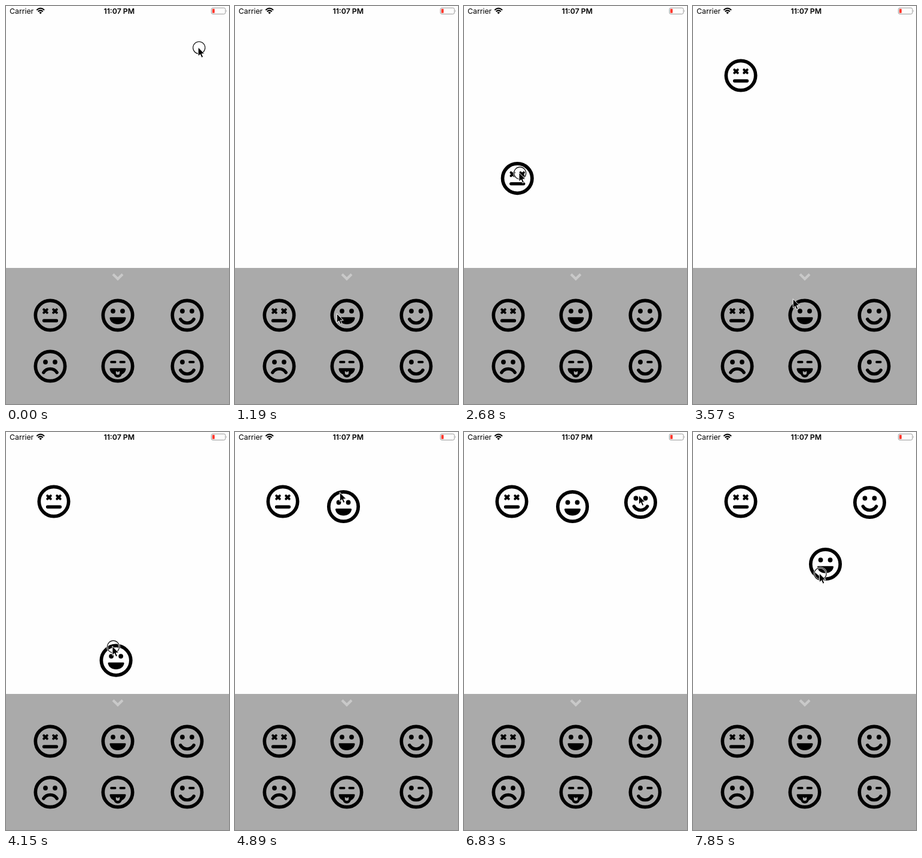
Write an HTML page that moves like this. It is 373x664 px and loops after 8 s.

```html
<!DOCTYPE html>
<html lang="en">
<head>
<meta charset="utf-8">
<title>Emoji drag and drop</title>
<style>
  html, body { margin: 0; height: 100%; overflow: hidden; background: #fefefe; }
  svg { display: block; width: 100vw; height: 100vh; }
  text { font: 12.3px Inter, sans-serif; }
  .line { fill: none; stroke: #000; stroke-width: 5.3; stroke-linecap: round; stroke-linejoin: round; }
  .thin { stroke-width: 4; }
</style>
</head>
<body>
<svg viewBox="0 0 373 664">
  <defs>
    <circle id="rim" r="24.7" fill="none" stroke="#000" stroke-width="5.7"/>
    <circle id="eye" r="3.9"/>
    <g id="eyes"><use href="#eye" x="-8" y="-7"/><use href="#eye" x="8" y="-7"/></g>
    <path id="cross" class="line thin" d="M-2.7-2.7 2.7 2.7M2.7-2.7-2.7 2.7"/>
    <path id="dash" class="line thin" d="M-3.2 0H3.2"/>
    <path id="smile" class="line" d="M-11.2 6.5C-6 15 6 15 11.2 6.5"/>
    <path id="grin" d="M-12.2 3.3H12.2Q13.8 3.3 13.5 5C12.4 11.3 7 15 0 15S-12.4 11.3-13.5 5Q-13.8 3.3-12.2 3.3Z"/>

    <g id="face0">
      <use href="#rim"/><use href="#cross" x="-8" y="-7"/><use href="#cross" x="8" y="-7"/>
      <path class="line" d="M-10.5 9H10.5"/>
    </g>
    <g id="face1"><use href="#rim"/><use href="#eyes"/><use href="#grin"/></g>
    <g id="face2"><use href="#rim"/><use href="#eyes"/><use href="#smile"/></g>
    <g id="face3">
      <use href="#rim"/><use href="#eyes"/>
      <path class="line" d="M-11.2 10.5C-6 2.3 6 2.3 11.2 10.5"/>
    </g>
    <g id="face4">
      <use href="#rim"/><use href="#dash" x="-7.7" y="-6.9"/><use href="#dash" x="7.7" y="-6.9"/>
      <use href="#grin"/>
      <path d="M-7 8H7V11.8a7 7 0 0 1-14 0Z"/>
      <path d="M-3.2 8 0 9.8 3.2 8V11a3.2 3.2 0 0 1-6.4 0Z" fill="#aaa"/>
    </g>
    <g id="face5">
      <use href="#rim"/><use href="#eye" x="-8" y="-7"/>
      <use href="#dash" x="7.4" y="-6.9"/><use href="#smile"/>
    </g>
  </defs>

  <rect width="373" height="664" fill="#fefefe"/>
  <text x="6" y="12.5">Carrier</text>
  <g fill="none" stroke="#000" stroke-width="2">
    <path d="M51.3 6.7Q57.7.9 64.1 6.7M53.6 9.2Q57.7 5.6 61.8 9.2"/>
    <path d="M57.7 13.4 55.3 10.8Q57.7 9 60.1 10.8Z" fill="#000" stroke="none"/>
  </g>
  <text x="189.3" y="12.5" text-anchor="middle" font-weight="600" style="font-weight:600">11:07 PM</text>
  <rect x="343.5" y="3.2" width="23.5" height="10.2" rx="2.4" fill="none" stroke="#999"/>
  <rect x="345" y="4.8" width="4" height="7" rx=".8" fill="#ff3b30"/>
  <path d="M368.2 6.6Q370 8.3 368.2 10Z" fill="#999"/>

  <rect y="437" width="373" height="227" fill="#aaa"/>
  <path d="M179 447.5 187 455.3 195 447.5" fill="none" stroke="#c9c9c9" stroke-width="4.2"/>
  <use href="#face0" x="74" y="516"/><use href="#face1" x="187" y="516"/><use href="#face2" x="303" y="516"/>
  <use href="#face3" x="74" y="601"/><use href="#face4" x="187" y="601"/><use href="#face5" x="303" y="601"/>

  <use class="placed" href="#face0"/><use class="placed" href="#face1"/><use class="placed" href="#face2"/>
  <g id="cursor">
    <g id="ring" fill="none">
      <circle cx="1.9" cy=".6" r="10.1" stroke="#fff" stroke-width="2.6"/>
      <circle cx="1.9" cy=".6" r="10.1" stroke="#000" stroke-width="1.1"/>
    </g>
    <path d="M.3-.3V15L3.8 11.7 6.2 17.2 8.8 16.1 6.5 10.8H11.2Z" stroke="#fff" stroke-width="1"/>
  </g>
</svg>
<script>
const LOOP = 8000, STEP = 148.1, LAST_STEP = 53;

// Each move eases the pointer to a point; times are in steps.
// A held move presses from the end of the move before it to the start of the next;
// grip is the way from the pointer tip to the centre of the face it carries.
const moves = [
  { start: 0, end: 0, to: [321, 69], held: true },
  { start: 1, end: 8, to: [170, 513.5] },
  { start: 8, end: 12, to: [81, 518] },
  { start: 15, end: 20.4, to: [82.5, 106.5], bend: 10, held: true, face: 0, grip: [-2.5, 9.5] },
  { start: 21, end: 24, to: [167, 489] },
  { start: 24, end: 26, to: [179, 497] },
  { start: 26, end: 31, to: [175, 101], held: true, face: 1, grip: [6.5, 23.5] },
  { start: 33, end: 39, to: [297, 502] },
  { start: 39, end: 45, to: [292, 106], bend: -10, held: true, face: 2, grip: [3.5, 11.5] },
  { start: 46, end: 49, to: [171, 140] },
  { start: 49, end: 53, to: [211, 236], bend: -60, held: true, face: 1, grip: [10.5, -15.5] }
];

const placed = document.querySelectorAll('.placed');
const cursor = document.getElementById('cursor');
const ring = document.getElementById('ring');

const ease = k => k * k * (3 - 2 * k);
const show = (node, on) => node.style.display = on ? '' : 'none';
const place = (node, [x, y]) => node.setAttribute('transform', `translate(${x} ${y})`);

function pointOn(index, step) {
  const { start, end, to, bend = 0 } = moves[index];
  if (step >= end) return to;
  const from = moves[index - 1].to;
  const k = (step - start) / (end - start);
  const [x, y] = to.map((value, axis) => from[axis] + (value - from[axis]) * ease(k));
  return [x + bend * Math.sin(Math.PI * k), y];
}

function isPressed(step) {
  return moves.some((move, i) => move.held
    && step >= (moves[i - 1]?.end ?? 0)
    && step < (moves[i + 1]?.start ?? Infinity));
}

function draw(now) {
  const step = Math.min(LAST_STEP, Math.floor((now % LOOP) / STEP));
  const current = moves.findLastIndex(move => move.start <= step);
  place(cursor, pointOn(current, step));
  show(ring, isPressed(step));

  placed.forEach((node, face) => {
    const index = moves.findLastIndex(move => move.face === face && move.start < step);
    show(node, index >= 0);
    if (index < 0) return;
    const { grip } = moves[index];
    place(node, pointOn(index, step).map((value, axis) => value + grip[axis]));
  });
}

const begin = performance.now();
function tick() {
  draw(performance.now() - begin);
  requestAnimationFrame(tick);
}
tick();
</script>
</body>
</html>
```
